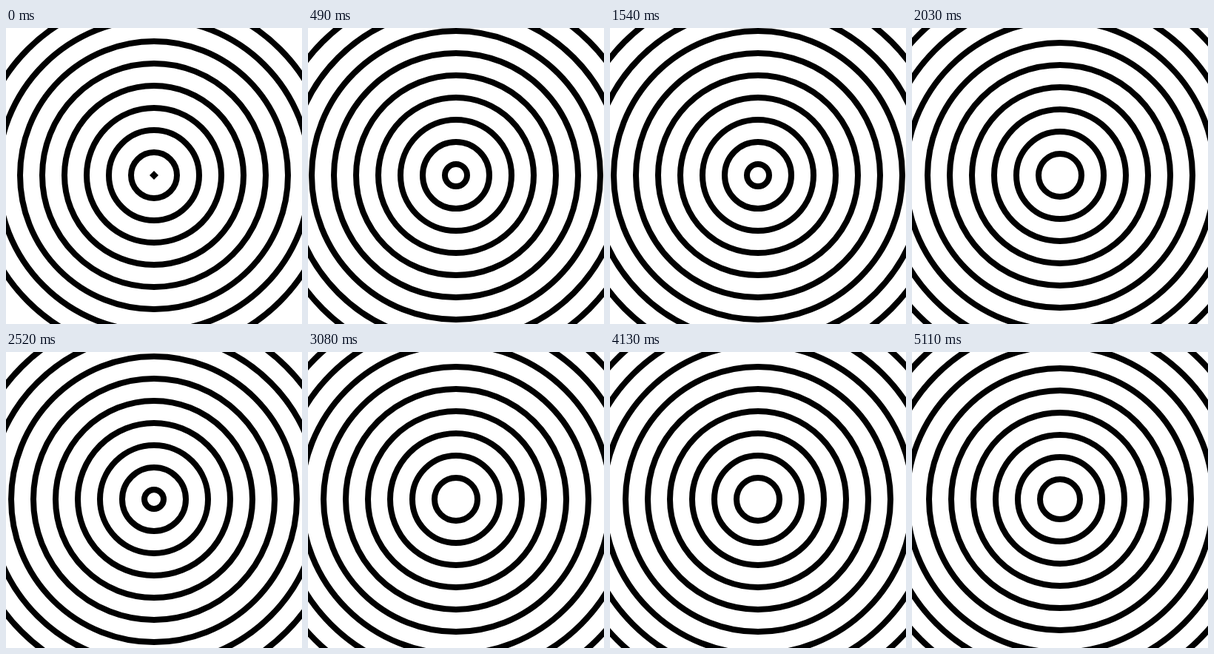
Recreate the animation shown at these times as an HTML page. Size 400 by 400 pixels, loop 5180 ms.

```html
<!DOCTYPE html>
<html lang="en">
<head>
<meta charset="utf-8">
<title>Expanding rings</title>
<style>
  html, body { margin: 0; width: 100%; height: 100%; overflow: hidden; background: #fff; }
  svg { display: block; width: 100%; height: 100%; }
</style>
</head>
<body>
<svg viewBox="0 0 400 400">
  <g id="rings" fill="none" stroke="#000" stroke-width="8"></g>
  <path id="seed" d="M200 193l6 6-6 6-6-6z"/>
</svg>
<script>
  const LOOP = 5180, STEP = 70;
  const GAP = 30, SPEED = 2, COUNT = 9;
  const group = document.getElementById('rings');
  const seed = document.getElementById('seed');

  const rings = Array.from({ length: COUNT }, () => {
    const ring = document.createElementNS(group.namespaceURI, 'circle');
    ring.setAttribute('cx', 200);
    ring.setAttribute('cy', 199);
    return group.appendChild(ring);
  });

  function draw(ms) {
    const tick = Math.floor((ms % LOOP) / STEP);
    const first = (1 + tick * SPEED) % GAP;
    const born = first === 1;
    rings.forEach((ring, i) => ring.setAttribute('r', first + i * GAP));
    // A newborn ring is too small for a hole and shows as a diamond.
    rings[0].style.display = born ? 'none' : '';
    seed.style.display = born ? '' : 'none';
  }

  const start = performance.now();
  function loop() {
    draw(performance.now() - start);
    requestAnimationFrame(loop);
  }
  draw(0);
  requestAnimationFrame(loop);
</script>
</body>
</html>
```
